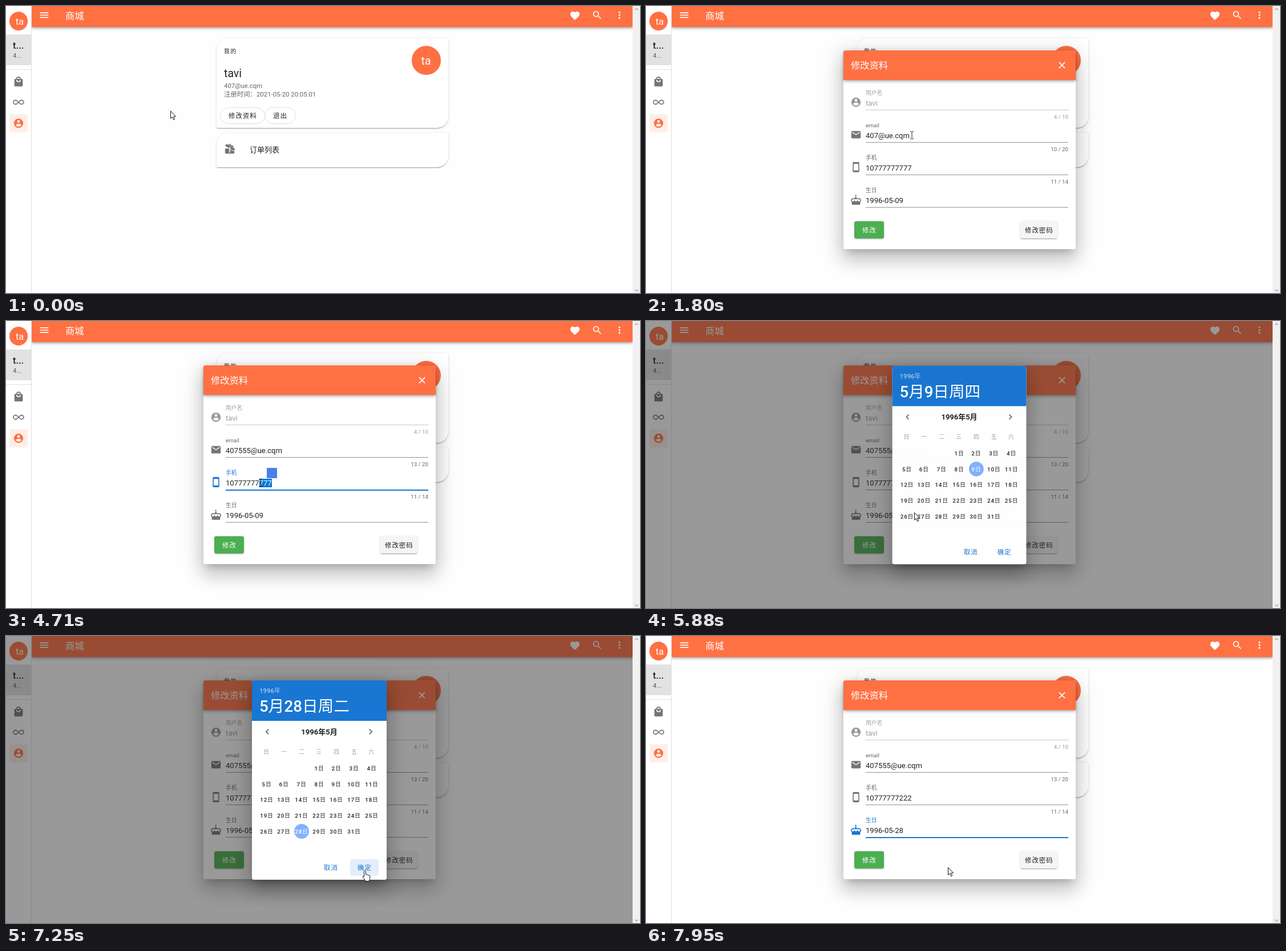
Recreate the animation shown at these times as an HTML page. Size 1111x504 px, loop 8 s.

```html
<!DOCTYPE html>
<html lang="zh-CN">
<head>
<meta charset="utf-8">
<title>商城</title>
<style>
html, body { margin: 0; width: 100%; height: 100%; overflow: hidden; background: #fefefe; }
#stage { position: absolute; left: 0; top: 0; width: 1111px; height: 504px; overflow: hidden; background: #fefefe; }
#stage div, #stage svg { position: absolute; box-sizing: border-box; }
#stage svg { width: 1px; height: 1px; overflow: visible; }
text { font-family: Roboto, "Noto Sans CJK SC", "Noto Sans CJK", sans-serif; white-space: pre; }
</style>
</head>
<body>
<div id="stage"></div>
<script>
const ORANGE = '#ff7043', BLUE = '#1976d2', INK = 'rgba(0,0,0,.87)', SOFT = 'rgba(0,0,0,.6)', OFF = 'rgba(0,0,0,.38)', ICON = '#757575';
const SHADOW = {
  low: 'box-shadow:0 2.4px .8px -1.6px #0003,0 1.6px 1.6px #00000024,0 .8px 4px #0000001f;',
  bar: 'box-shadow:0 1.6px 3.3px -.8px #0003,0 3.3px 4px #00000024,0 .8px 8px #0000001f;',
  high: 'box-shadow:0 9px 12px -5.7px #0003,0 19.5px 31px 2.4px #00000024,0 7.3px 37px 6.5px #0000001f;'
};
const ICONS = {
  menu: 'M3 6H21V8H3ZM3 11H21V13H3ZM3 16H21V18H3Z',
  heart: 'M12,21.35L10.55,20.03C5.4,15.36 2,12.27 2,8.5C2,5.41 4.42,3 7.5,3C9.24,3 10.91,3.81 12,5.08C13.09,3.81 14.76,3 16.5,3C19.58,3 22,5.41 22,8.5C22,12.27 18.6,15.36 13.45,20.03Z',
  search: 'M9.5,3A6.5,6.5 0 0,1 16,9.5C16,11.11 15.41,12.59 14.44,13.73L14.71,14H15.5L20.5,19L19,20.5L14,15.5V14.71L13.73,14.44C12.59,15.41 11.11,16 9.5,16A6.5,6.5 0 0,1 9.5,3M9.5,5C7,5 5,7 5,9.5C5,12 7,14 9.5,14C12,14 14,12 14,9.5C14,7 12,5 9.5,5Z',
  dots: 'M12 4a2 2 0 0 1 0 4a2 2 0 0 1 0-4M12 10a2 2 0 0 1 0 4a2 2 0 0 1 0-4M12 16a2 2 0 0 1 0 4a2 2 0 0 1 0-4',
  bag: 'M12,13A5,5 0 0,1 7,8H9A3,3 0 0,0 15,8H17A5,5 0 0,1 12,13M12,3A3,3 0 0,1 15,6H9A3,3 0 0,1 12,3M19,6H17A5,5 0 0,0 7,6H5C3.89,6 3,6.89 3,8V20A2,2 0 0,0 5,22H19A2,2 0 0,0 21,20V8C21,6.89 20.1,6 19,6Z',
  loop: 'M18.6,6.62C21.58,6.62 24,9 24,12C24,14.96 21.58,17.37 18.6,17.37C17.15,17.37 15.8,16.81 14.78,15.8L12,13.34L9.17,15.85C8.2,16.82 6.84,17.38 5.4,17.38C2.42,17.38 0,14.96 0,12C0,9.04 2.42,6.62 5.4,6.62C6.84,6.62 8.2,7.18 9.22,8.2L12,10.66L14.83,8.15C15.8,7.18 17.16,6.62 18.6,6.62M7.8,14.39L10.5,12L7.84,9.65C7.16,8.97 6.31,8.62 5.4,8.62C3.53,8.62 2,10.13 2,12C2,13.87 3.53,15.38 5.4,15.38C6.31,15.38 7.16,15.03 7.8,14.39M16.2,9.61L13.5,12L16.16,14.35C16.84,15.03 17.7,15.38 18.6,15.38C20.47,15.38 22,13.87 22,12C22,10.13 20.47,8.62 18.6,8.62C17.69,8.62 16.84,8.97 16.2,9.61Z',
  user: 'M12,19.2C9.5,19.2 7.29,17.92 6,16C6.03,14 10,12.9 12,12.9C14,12.9 17.97,14 18,16C16.71,17.92 14.5,19.2 12,19.2M12,5A3,3 0 0,1 12,11A3,3 0 0,1 12,5M12,2A10,10 0 0,0 12,22A10,10 0 0,0 12,2Z',
  mail: 'M20,8L12,13L4,8V6L12,11L20,6M20,4H4C2.89,4 2,4.89 2,6V18A2,2 0 0,0 4,20H20A2,2 0 0,0 22,18V6C22,4.89 21.1,4 20,4Z',
  phone: 'M17,19H7V5H17M17,1H7C5.89,1 5,1.89 5,3V21A2,2 0 0,0 7,23H17A2,2 0 0,0 19,21V3C19,1.89 18.1,1 17,1Z',
  cake: 'M11.5,.5C12,.75 13,2.4 13,3.5C13,4.6 12.33,5 11.5,5C10.67,5 10,4.85 10,3.75C10,2.65 11,2 11.5,.5M18.5,9C21,9 23,11 23,13.5C23,15.06 22.21,16.43 21,17.24V23H3V17.24C1.79,16.43 1,15.06 1,13.5C1,11 3,9 5.5,9H10V6H13V9H18.5M12,16A2.5,2.5 0 0,0 14.5,13.5H16A2.5,2.5 0 0,0 21,13.5A2.5,2.5 0 0,0 18.5,11H5.5A2.5,2.5 0 0,0 5.5,16A2.5,2.5 0 0,0 8,13.5H9.5A2.5,2.5 0 0,0 12,16Z',
  gift: 'M22 10.92L19.26 9.33C21.9 7.08 19.25 2.88 16.08 4.31L15.21 4.68L15.1 3.72C15 2.64 14.44 1.87 13.7 1.42C12.06 .47 9.56 1.12 9.16 3.5L6.41 1.92C5.45 1.36 4.23 1.69 3.68 2.65L2.68 4.38C2.4 4.86 2.57 5.47 3.05 5.75L10.84 10.25L12.34 7.65L14.07 8.65L12.57 11.25L20.36 15.75C20.84 16 21.46 15.86 21.73 15.38L22.73 13.65C23.28 12.69 22.96 11.47 22 10.92M12.37 5C11.5 5.25 10.8 4.32 11.24 3.55C11.5 3.07 12.13 2.91 12.61 3.18C13.38 3.63 13.23 4.79 12.37 5M17.56 8C16.7 8.25 16 7.32 16.44 6.55C16.71 6.07 17.33 5.91 17.8 6.18C18.57 6.63 18.42 7.79 17.56 8M20.87 16.88C21.28 16.88 21.67 16.74 22 16.5V20C22 21.11 21.11 22 20 22H4C2.9 22 2 21.11 2 20V11H10.15L11 11.5V20H13V12.65L19.87 16.61C20.17 16.79 20.5 16.88 20.87 16.88Z',
  close: 'M19,6.41L17.59,5L12,10.59L6.41,5L5,6.41L10.59,12L5,17.59L6.41,19L12,13.41L17.59,19L19,17.59L13.41,12Z',
  prev: 'M15.41,16.58L10.83,12L15.41,7.41L14,6L8,12L14,18Z',
  next: 'M8.59,16.58L13.17,12L8.59,7.41L10,6L16,12L10,18Z'
};

const stage = document.getElementById('stage');

function box(parent, x, y, w, h, css = '') {
  const e = document.createElement('div');
  e.style.cssText = `left:${x}px;top:${y}px;width:${w}px;height:${h}px;${css}`;
  parent.append(e);
  return e;
}
function draw(parent, x, y, markup) {
  const s = document.createElementNS('http://www.w3.org/2000/svg', 'svg');
  s.style.cssText = `left:${x}px;top:${y}px`;
  s.innerHTML = markup;
  parent.append(s);
  return s.firstChild;
}
const text = (parent, x, y, size, str, fill = INK, attrs = '') =>
  draw(parent, x, y, `<text font-size="${size}" fill="${fill}" ${attrs}>${str}</text>`);
const icon = (parent, name, x, y, fill, size = 19.55) =>
  draw(parent, x, y, `<path transform="scale(${size / 24}) translate(-12 -12)" d="${ICONS[name]}" fill="${fill}"/>`);
const layer = () => box(stage, 0, 0, 1111, 504);
const MID = 'text-anchor="middle"', END = 'text-anchor="end"', WIDE = 'letter-spacing="1.02"';

// Page
const page = layer();
box(page, 45, 0, 1053, 37, `background:${ORANGE};${SHADOW.bar}`);
icon(page, 'menu', 67.4, 16.3, '#fff');
text(page, 103.5, 23, 16.3, '商城', '#fff');
icon(page, 'heart', 996.8, 16.5, '#fff');
icon(page, 'search', 1035.9, 16.3, '#fff');
icon(page, 'dots', 1075, 16.3, '#fff');

box(page, 0, 0, 45, 504, 'background:#fff;border-right:1px solid #e0e0e0');
box(page, 5.7, 10.3, 32.6, 32.6, `background:${ORANGE};border-radius:50%`);
text(page, 17, 33, 16.3, 'ta', '#fff');
box(page, 0, 50, 45, 54, 'background:#e2e2e2');
text(page, 12, 75, 16.3, 't...', INK, 'font-weight="500"');
text(page, 12, 91, 11.4, '4...', SOFT);
box(page, 0, 111, 44, 1, 'background:#e0e0e0');
icon(page, 'bag', 22, 133, ICON);
icon(page, 'loop', 22, 169.3, ICON);
box(page, 6, 190, 32, 32, 'background:#ffeee8;border-radius:3px');
icon(page, 'user', 22, 205.5, ORANGE);

const CARD = 'background:#fff;border-radius:19.5px 3.3px;' + SHADOW.low;
const PILL = 'border:1px solid #dedede;border-radius:15px;';
box(page, 368.5, 57, 406.5, 157, CARD);
text(page, 381.5, 83, 9.8, '我的', INK, 'letter-spacing="1.63"');
text(page, 381.6, 125, 19.55, 'tavi');
text(page, 381.6, 143.5, 11.4, '407@ue.cqm', SOFT);
text(page, 381.6, 158.7, 11.4, '注册时间：2021-05-20 20:05:01', SOFT);
box(page, 711, 70, 50.6, 50.6, `background:${ORANGE};border-radius:50%`);
text(page, 736.2, 102.5, 19.55, 'ta', '#fff', MID);
const editBtn = box(page, 375, 178, 79, 29, PILL);
text(page, 389.7, 196.8, 11.4, '修改资料', INK, WIDE);
box(page, 453, 178, 55, 29, PILL);
text(page, 467.8, 196.8, 11.4, '退出', INK, WIDE);
box(page, 368.5, 222.5, 406.5, 60, CARD);
icon(page, 'gift', 391.6, 251.3, ICON);
text(page, 427.3, 257.3, 13.04, '订单列表');

// Profile form
const form = layer();
box(form, 345.5, 78, 407, 349, 'background:#fff;border-radius:3.3px;' + SHADOW.high);
box(form, 345.5, 78, 407, 52, `background:${ORANGE};border-radius:3.3px 3.3px 0 0;${SHADOW.bar}`);
const titleCaret = box(form, 359, 95, 1, 18, 'background:#fff');
text(form, 358.5, 109.8, 16.3, '修改资料', '#fff');
icon(form, 'close', 729.4, 103.5, '#fff');

function field(row, iconName, label, counted, off) {
  const y = 57 * row, f = {};
  f.icon = icon(form, iconName, 367.8, 168.7 + y, off ? 'rgba(0,0,0,.4)' : ICON);
  f.label = text(form, 385, 156.3 + y, 9.78, label, off ? OFF : SOFT);
  f.mark = box(form, 0, 276.5, 0, 15, 'background:#0078d7');
  f.value = text(form, 385, 174.6 + y, 13.04, '', off ? OFF : INK);
  f.caret = box(form, 0, 162 + y, 1, 15, 'background:#222');
  box(form, 385, 182 + y, 355, 1, off ? 'border-top:1px dotted #949494' : 'background:#949494');
  f.line = box(form, 385, 182 + y, 355, 2, `background:${BLUE}`);
  if (counted) f.count = text(form, 739.6, 197.5 + y, 9.78, '', off ? OFF : SOFT, END);
  f.caret.style.display = f.mark.style.display = 'none';
  f.line.style.transform = 'scaleX(0)';
  return f;
}
const name = field(0, 'user', '用户名', true, true);
const email = field(1, 'mail', 'email', true);
const phone = field(2, 'phone', '手机', true);
const birth = field(3, 'cake', '生日');
name.value.textContent = 'tavi';
name.count.textContent = '4 / 10';
const BTN = 'border-radius:3.3px;' + SHADOW.low;
box(form, 365, 378, 52, 29.5, 'background:#4caf50;' + BTN);
text(form, 378.8, 397.5, 11.4, '修改', '#fff', WIDE);
box(form, 655.5, 378, 65, 29.5, 'background:#f5f5f5;' + BTN);
text(form, 663.7, 397.5, 11.4, '修改密码', INK, WIDE);
const badge = box(form, 457, 258, 18, 18, 'background:#4a80e8');

// Date picker
const veil = box(stage, 0, 0, 1098, 504, 'background:#212121');
const picker = layer();
picker.style.transformOrigin = '549px 252.6px';
box(picker, 431, 78, 236, 349.5, 'background:#fff;border-radius:3.3px;' + SHADOW.high);
box(picker, 431, 78, 236, 71, `background:${BLUE};border-radius:3.3px 3.3px 0 0`);
text(picker, 444, 100, 11.4, '1996年', 'rgba(255,255,255,.6)', 'font-weight="500"');
const headline = text(picker, 444, 132.6, 27.7, '', '#fff', 'font-weight="500"');
icon(picker, 'prev', 458, 168, SOFT);
icon(picker, 'next', 639.2, 168, SOFT);
text(picker, 548.6, 173.3, 13.04, '1996年5月', INK, MID + ' font-weight="700"');
const colX = i => 456.3 + 30.68 * i;
[...'日一二三四五六'].forEach((d, i) => text(picker, colX(i), 207, 9.78, d, OFF, MID + ' font-weight="500"'));
const days = Array.from({ length: 31 }, (_, i) => {
  const cell = i + 3, x = colX(cell % 7), y = 232.4 + 27.7 * Math.floor(cell / 7);
  return {
    x, y,
    disc: box(picker, x - 13, y - 13, 26, 26, 'border-radius:50%'),
    label: text(picker, x + .4, y + 3.6, 9.78, i + 1 + '日', INK, MID + ' letter-spacing=".87" font-weight="500"')
  };
});
const okBtn = box(picker, 602.5, 392, 50, 29, 'overflow:hidden;border-radius:3.3px');
const ripple = box(okBtn, 1, -9.5, 48, 48, 'border-radius:50%;background:rgba(25,118,210,.24)');
text(picker, 557, 411.3, 11.4, '取消', BLUE, WIDE);
text(picker, 615.8, 411.3, 11.4, '确定', BLUE, WIDE);

// Scrollbar
box(stage, 1098, 0, 13, 504, 'background:#f1f1f1');
draw(stage, 1104.5, 0, '<path d="M-3 7L0 4L3 7M-3 498L0 501L3 498" fill="none" stroke="#a3a3a3" stroke-width="1.2"/>');

// Pointer
const OUTLINE = 'fill="#fff" stroke="#111" stroke-linejoin="round"';
const pointers = {
  arrow: `<path d="M.5 .5V13.6L3.4 10.9L5.6 15.8L7.7 14.9L5.6 10.1H9.6Z" ${OUTLINE}/>`,
  hand: `<path transform="translate(-4.5 -.5)" d="M4.5 .5C5.6 .5 6 1.2 6 2V7.4C6.5 6.8 8.2 7 8.4 8.2C9 7.4 10.6 7.7 10.8 9C11.6 8.4 13.2 8.9 13.2 10.4V13.5C13.2 15.6 11.9 16.6 11.7 19H5.2C5 16.5 2.5 14.5 .8 11.8C.2 10.6 1.6 9.8 2.4 10.6L3 11.2V2C3 1.2 3.4 .5 4.5 .5Z" ${OUTLINE}/>`,
  beam: '<path d="M-3 -6.5H-1L0 -5.5L1 -6.5H3M0 -5.5V5.5M-3 6.5H-1L0 5.5L1 6.5H3" fill="none" stroke="#222"/>'
};
for (const k in pointers) pointers[k] = draw(stage, 0, 0, pointers[k]).ownerSVGElement;

// Timing: spans in which the screen refreshes [from, to, steps]
const SPANS = [[70, 830, 12], [900, 1670, 12], [1740, 2350, 9], [2680, 2880, 3], [3150, 3890, 12], [3960, 4710, 10],
  [4790, 5530, 10], [5670, 6430, 12], [6500, 7250, 12], [7320, 7950, 10]];
const PATH = [[0, 288, 184], [70, 291, 181], [300, 325, 166], [560, 395, 172], [760, 432, 189], [830, 437, 190], [900, 440, 192],
  [1040, 472, 206], [1300, 505, 220], [1670, 480, 226], [1740, 466, 227], [2000, 409, 229], [3300, 409, 229],
  [3600, 520, 270], [3890, 690, 285], [3960, 742, 285], [4050, 742, 285], [4480, 446, 284], [4900, 446, 284],
  [5100, 520, 236], [5530, 470, 343], [5670, 470, 343], [5900, 470, 335], [6360, 521.5, 345], [6600, 521.5, 345],
  [6900, 750, 392], [7200, 632, 411], [7320, 624, 413], [7670, 624, 413], [7880, 535, 407], [7950, 529, 406]];

const clamp = v => Math.max(0, Math.min(1, v));
const show = (e, on) => { e.style.display = on ? '' : 'none'; };
const within = (v, a, b) => v >= a && v < b;

function hold(t) {
  let last = 0;
  for (const [a, b, n] of SPANS) {
    if (t < a) break;
    const step = (b - a) / (n - 1);
    last = t >= b ? b : a + Math.floor((t - a) / step + 1e-6) * step;
  }
  return last;
}
function pointerAt(t) {
  const i = PATH.findIndex(p => p[0] > t);
  if (i < 0) return PATH[PATH.length - 1].slice(1);
  const [t0, x0, y0] = PATH[i - 1], [t1, x1, y1] = PATH[i], k = (t - t0) / (t1 - t0);
  return [x0 + (x1 - x0) * k, y0 + (y1 - y0) * k];
}
// cubic-bezier(.25, .8, x2, 1)
function ease(x, x2) {
  x = clamp(x);
  let lo = 0, hi = 1;
  for (let i = 0; i < 24; i++) {
    const m = (lo + hi) / 2, n = 1 - m;
    if (3 * n * n * m * .25 + 3 * n * m * m * x2 + m ** 3 < x) lo = m; else hi = m;
  }
  const n = 1 - lo;
  return 3 * n * n * lo * .8 + 3 * n * lo * lo + lo ** 3;
}
function focus(f, t, on, off) {
  const p = clamp((t - on) / 300) - clamp((t - off) / 300);
  const tint = base => `color-mix(in srgb, ${BLUE} ${p * 100}%, ${base})`;
  f.icon.style.fill = tint(ICON);
  f.label.style.fill = tint('#666');
  f.line.style.transform = `scaleX(${t < off ? p : 0})`;
}
function caretAt(f, chars, on) {
  show(f.caret, on);
  f.caret.style.left = Math.round(385 + chars * 7.32) + 'px';
}

function render(t) {
  const [x, y] = pointerAt(t);
  const pickerOpen = within(t, 5670, 7700), formOpen = t >= 900;
  const overEdit = !formOpen && x > 375 && y > 178;
  editBtn.style.background = overEdit || within(t, 840, 1000) ? '#f6f6f6' : '#fff';

  // Form
  show(form, formOpen);
  form.style.transform = `translateY(${349 * (1 - ease((t - 862) / 300, .5))}px)`;
  show(titleCaret, t < 1700);

  const added = [2680, 3150, 3200].filter(k => t >= k).length;
  email.value.textContent = '407' + '5'.repeat(added) + '@ue.cqm';
  email.count.textContent = `${10 + added} / 20`;
  focus(email, t, 2000, 3760);
  const lastKey = [2000, 2680, 3150, 3200].filter(k => t >= k).pop();
  caretAt(email, 3 + added, within(t, 2000, 3760) && (t - lastKey) % 1000 < 500);

  const typed = [4930, 5080, 5230].filter(k => t >= k).length;
  const picked = within(t, 4050, 4930) ? Math.round(clamp((465.5 - x) / 21.96) * 3) : 0;
  const digits = typed ? '10777777' + '2'.repeat(typed) : '10777777777';
  const cut = digits.length - picked;
  phone.value.innerHTML = digits.slice(0, cut) + `<tspan fill="#fff">${digits.slice(cut)}</tspan>`;
  phone.count.textContent = `${digits.length} / 14`;
  show(phone.mark, picked);
  phone.mark.style.left = 385 + cut * 7.32 + 'px';
  phone.mark.style.width = picked * 7.32 + 'px';
  focus(phone, t, 3760, 5600);
  caretAt(phone, digits.length, within(t, 3760, 5600) && !picked && (t < 4300 || within(t, 4930, 5450)));
  show(badge, within(t, 4600, 4780));

  birth.value.textContent = t < 7640 ? '1996-05-09' : '1996-05-28';
  focus(birth, t, 7610, 9000);

  // Picker
  const shown = ease((t - 5650) / 300, .25) * (1 - ease((t - 7665) / 300, .25));
  show(picker, shown > .01);
  picker.style.opacity = shown;
  picker.style.transform = `scale(${.5 + shown / 2})`;
  veil.style.opacity = .46 * (clamp((t - 5650) / 200) - clamp((t - 7620) / 250));

  const chosen = t < 6550 ? 9 : 28;
  headline.textContent = chosen === 9 ? '5月9日周四' : '5月28日周二';
  headline.style.opacity = t < 6550 ? 1 : clamp(.3 + (t - 6550) / 250);
  let overDay = false;
  days.forEach((d, i) => {
    const hover = pickerOpen && Math.hypot(x - d.x, y - d.y) < 13, on = i + 1 === chosen;
    overDay = overDay || hover;
    d.disc.style.background = on ? '#82b1ff' : hover ? '#ebebeb' : 'none';
    d.label.style.fill = on ? '#fff' : INK;
  });
  const overOk = within(t, 6800, 7700) && within(x, 602, 653) && within(y, 392, 421);
  okBtn.style.background = overOk ? 'rgba(25,118,210,.12)' : 'none';
  show(ripple, t >= 7560);
  ripple.style.transform = `scale(${clamp((t - 7500) / 150)})`;

  // Pointer
  const overInput = formOpen && t > 1100 && !within(t, 5650, 8000) && within(x, 385, 740) && within(y, 218, 355);
  const kind = overEdit || overDay || overOk ? 'hand' : overInput ? 'beam' : 'arrow';
  for (const k in pointers) show(pointers[k], k === kind);
  pointers[kind].style.left = Math.round(x) + 'px';
  pointers[kind].style.top = Math.round(y) + 'px';
}

const start = performance.now();
let drawn = -1;
function tick() {
  const t = hold((performance.now() - start) % 8000);
  if (t !== drawn) render(drawn = t);
  requestAnimationFrame(tick);
}
tick();
</script>
</body>
</html>
```
